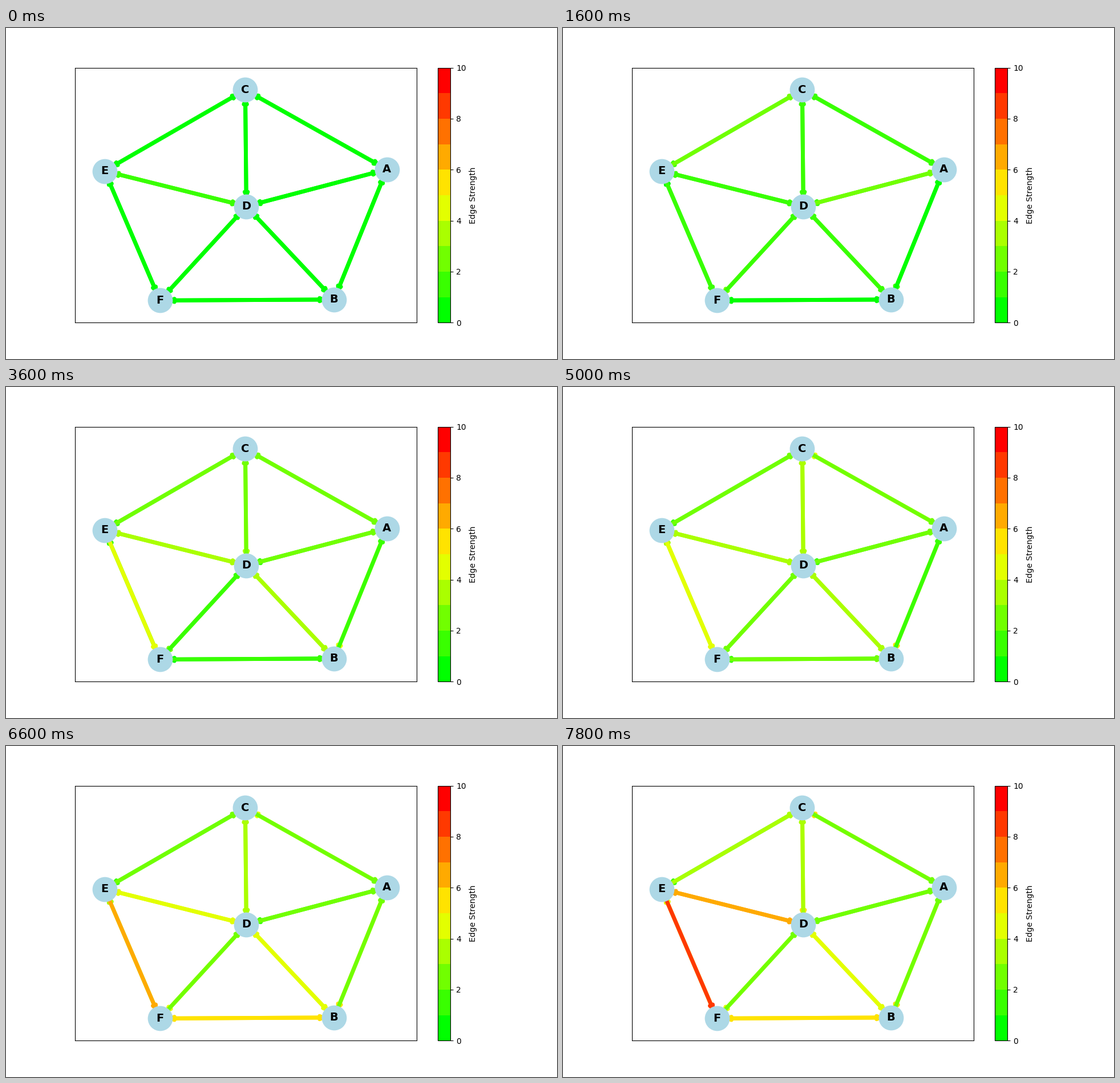
Write a matplotlib script that moves like this. It is 966 px wide and 580 px high and loops after 8000 ms.

```python
import math

import matplotlib.pyplot as plt
from matplotlib.animation import FuncAnimation
from matplotlib.cm import ScalarMappable
from matplotlib.colors import LinearSegmentedColormap, Normalize
from matplotlib.patches import FancyArrowPatch

W, H, DPI = 966, 580, 100
STEPS, STEP_MS = 40, 200

# Node centres in stage pixels, in drawing order
NODES = {
    "A": (667.7, 247.8),
    "B": (575.1, 475.8),
    "C": (419.4, 108.4),
    "D": (421.4, 312.5),
    "F": (270.0, 477.4),
    "E": (172.8, 250.5),
}

# Steps at which each directed edge gains one unit of strength
GAINS = {
    "AB": [4, 14, 15, 18, 20],
    "AC": [5, 15, 20, 24, 34],
    "AD": [6, 39],
    "BA": [12, 27],
    "BD": [8, 11, 16, 29],
    "BF": [21, 26, 28, 31, 33],
    "CA": [3, 10],
    "CD": [3, 9, 11, 34, 38],
    "CE": [3],
    "DA": [2, 6],
    "DB": [4, 9, 11, 29],
    "DC": [5, 15, 21],
    "DF": [2, 7, 27, 31],
    "DE": [0, 15, 18, 28, 34, 36],
    "FB": [17, 25, 26, 30, 33],
    "FD": [6, 22],
    "FE": [13, 19, 23, 35],
    "EC": [1, 5, 37],
    "ED": [0, 14, 17, 28, 35, 38],
    "EF": [7, 10, 12, 16, 27, 32, 36, 39],
}

cmap = LinearSegmentedColormap.from_list("strength", ["lime", "yellow", "red"], N=10)
norm = Normalize(0, 10)

fig, ax = plt.subplots(figsize=(W / DPI, H / DPI), dpi=DPI)
fig.colorbar(ScalarMappable(norm, cmap), ax=ax, label="Edge Strength")


def add_arrow(edge):
    margin = math.sqrt(300) / 2
    arrow = FancyArrowPatch(
        NODES[edge[0]], NODES[edge[1]], arrowstyle="-|>", mutation_scale=10,
        shrinkA=margin, shrinkB=margin, linewidth=5, zorder=1)
    return ax.add_patch(arrow)


arrows = {edge: add_arrow(edge) for edge in GAINS}
xs, ys = zip(*NODES.values())
ax.scatter(xs, ys, s=900, c="lightblue", linewidths=1.5, zorder=2)
for name, (x, y) in NODES.items():
    ax.text(x, y, name, size=14, weight="bold", ha="center", va="center")

# Data units equal stage pixels, with y pointing down
box = ax.get_position()
ax.set_xlim(box.x0 * W, box.x1 * W)
ax.set_ylim((1 - box.y0) * H, (1 - box.y1) * H)
ax.set_xticks([])
ax.set_yticks([])


def update(step):
    for edge, arrow in arrows.items():
        strength = sum(gain <= step for gain in GAINS[edge])
        arrow.set_color(cmap(norm(strength + 0.5)))
    return list(arrows.values())


anim = FuncAnimation(fig, update, frames=STEPS, interval=STEP_MS,
                     repeat=True, repeat_delay=0)
plt.show()
```
